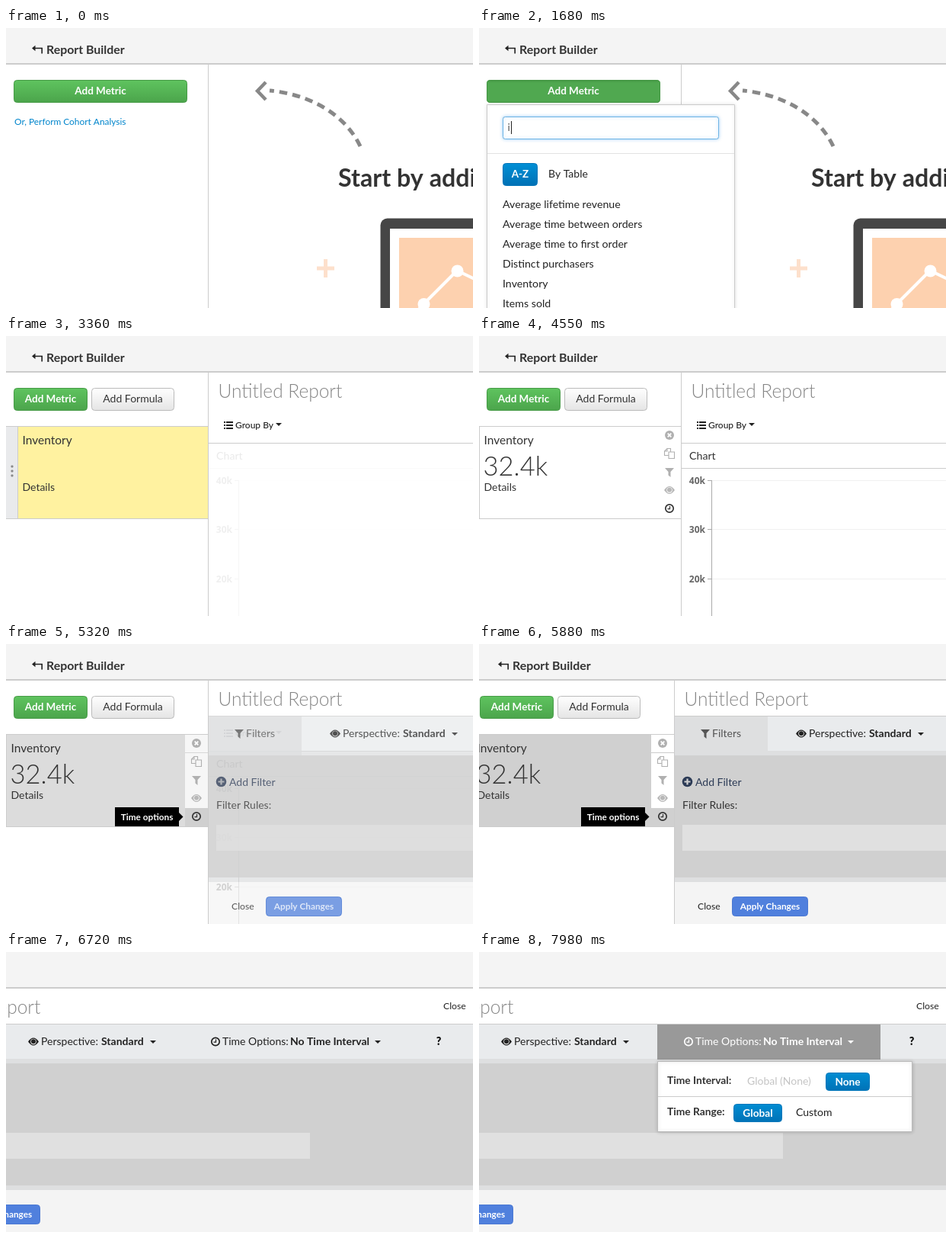
Animation, 613 px wide and 367 px high, one loop 9.87 s. Source, as an HTML page with a canvas:

```html
<!DOCTYPE html>
<html lang="en">
<head>
<meta charset="utf-8">
<title>Report Builder</title>
<style>
html, body { margin: 0; width: 100%; height: 100%; overflow: hidden; background: #fff; }
canvas { display: block; }
</style>
</head>
<body>
<canvas id="stage" width="613" height="367"></canvas>
<script>
const c = document.getElementById('stage').getContext('2d');
const LOOP = 9870, TICK = 70, W = 1010, H = 367;
const DARK = '#333', LINE = '#ccc', GREY = '#d0d0d0';

const clamp = v => Math.max(0, Math.min(1, v));
const smooth = u => u * u * (3 - 2 * u);
const ramp = (t, from, to) => clamp((t - from + TICK) / (to - from + TICK));

function text(s, x, y, size, color = DARK, weight = 400, align = 'left', family = 'Lato') {
  c.font = `${weight} ${size}px ${family}, sans-serif`;
  c.fillStyle = color;
  c.textAlign = align;
  c.fillText(s, x, y);
}
function rect(x, y, w, h, color) {
  c.fillStyle = color;
  c.fillRect(x, y, w, h);
}
function box(x, y, w, h, r, fill, border) {
  c.beginPath();
  c.roundRect(x + .5, y + .5, w - 1, h - 1, r);
  c.fillStyle = fill;
  c.fill();
  if (border) { c.strokeStyle = border; c.lineWidth = 1; c.stroke(); }
}
function gradient(y, h, top, bottom) {
  const g = c.createLinearGradient(0, y, 0, y + h);
  g.addColorStop(0, top);
  g.addColorStop(1, bottom);
  return g;
}
function stroke(d, color, width, dash = []) {
  c.strokeStyle = color;
  c.lineWidth = width;
  c.setLineDash(dash);
  c.stroke(new Path2D(d));
  c.setLineDash([]);
}
function fill(d, color) {
  c.fillStyle = color;
  c.fill(new Path2D(d));
}
function disc(x, y, r, color) {
  c.beginPath();
  c.arc(x, y, r, 0, 7);
  c.fillStyle = color;
  c.fill();
}
function fade(alpha, draw) {
  if (alpha <= 0) return;
  c.save();
  c.globalAlpha *= alpha;
  draw();
  c.restore();
}
function shadow(blur, color, draw) {
  c.save();
  c.shadowBlur = blur;
  c.shadowColor = color;
  draw();
  c.restore();
}

// Icons, placed by their centre
const icon = {
  clock(x, y, color) {
    c.beginPath();
    c.arc(x, y, 5.2, 0, 7);
    c.strokeStyle = color;
    c.lineWidth = 1.7;
    c.stroke();
    stroke(`M${x + .5} ${y - 3}V${y + .7}H${x - 2.5}`, color, 1.2);
  },
  eye(x, y, color) {
    fill(`M${x - 7} ${y}q7 -10 14 0q-7 10 -14 0`, color);
    disc(x, y, 3.7, '#fff');
    disc(x, y - .3, 3, color);
  },
  funnel(x, y, color) {
    fill(`M${x - 6} ${y - 6}h12l-4.5 5v7l-3 -2.5v-4.5z`, color);
  },
  copy(x, y, color) {
    stroke(`M${x - 1} ${y - 2}h7.5v8.5h-7.5zM${x - 1} ${y + 2.5}h-5.5v-5.5l3.5 -3.5h4.5v4.5M${x - 6} ${y - 3}h3v-3`, color, 1.1);
  },
  close(x, y, color) {
    disc(x, y, 6, color);
    stroke(`M${x - 2.3} ${y - 2.3}l4.6 4.6m0 -4.6l-4.6 4.6`, '#fff', 1.8);
  },
  plus(x, y, color) {
    disc(x, y, 6.8, color);
    stroke(`M${x - 4} ${y}h8m-4 -4v8`, GREY, 2.2);
  },
  caret(x, y, color) {
    fill(`M${x - 4} ${y - 2}h8l-4 4z`, color);
  }
};

function header() {
  rect(0, 0, W, 46, '#f4f4f4');
  rect(0, 46, W, 2, LINE);
  stroke('M47.2 33.5V26.5H36', '#222', 1.6);
  fill('M34 26.5l4.5 -3.7v7.4z', '#222');
  text('Report Builder', 53, 34, 15.9, DARK, 700);
}

function welcome() {
  stroke('M465 155C445 113 399 87 346 82', '#888', 5, [10.5, 7]);
  stroke('M341 71L330 82.5L341 94', '#888', 4.5);
  text('Start by adding a metric', 436, 208, 32.2, DARK, 700);
  stroke('M408 315h23M419.5 303v24', '#fde0cc', 5);
  box(491, 249, 200, 200, 9, '#464646');
  rect(504, 263, 200, 200, '#fff');
  rect(516, 275, 200, 200, '#fdd1af');
  stroke('M520 392L548 362L592 318L640 341', '#fff', 4);
  disc(548.5, 362, 8, '#fff');
  disc(592.5, 318.5, 8, '#fff');
}

function greenButton(w, hover, pressed) {
  box(10, 68, w, 30, 4, gradient(68, 30, '#5fc45f', '#4ba44b'), '#479b47');
  fade(hover, () => box(10, 68, w, 30, 4, '#50a850', '#449644'));
  if (pressed) rect(11, 69, w - 2, 3, gradient(69, 3, '#469a46', '#50a850'));
  text('Add Metric', 10 + w / 2, 87, 13.5, '#fff', 700, 'center');
}

function picker(t) {
  const query = t < 1680 ? '' : t < 1750 ? 'i' : t < 1820 ? 'inv' : t < 1960 ? 'inve' : 'inven';
  const filtered = t >= 1820;
  const names = filtered ? ['Inventory'] : ['Average lifetime revenue', 'Average time between orders',
    'Average time to first order', 'Distinct purchasers', 'Inventory', 'Items sold'];
  shadow(4, 'rgba(0,0,0,.12)', () => box(10, 100, 326, filtered ? 156 : 300, 0, '#fff', LINE));

  box(31, 116, 284, 30, 3, '#fff', LINE);
  fade(1 - ramp(t, 3010, 3150), () =>
    shadow(4, 'rgba(82,168,236,.5)', () => box(31, 116, 284, 30, 3, '#fff', '#6fb5e6')));
  text(query, 37.5, 135, 14, '#555');
  if (query && t < 2450) rect(Math.round(38.5 + c.measureText(query).width), 122, 1, 17, '#222');
  rect(11, 164, 324, 1, '#e2e2e2');

  box(31, 177, 46, 30, 4, gradient(177, 30, '#0090d6', '#0070b4'), '#0074b8');
  text('A-Z', 54, 196, 13.5, '#fff', 700, 'center');
  if (t >= 2590 && t < 2730) box(79, 177, 77, 30, 4, '#e6e6e6', '#c4c4c4');
  text('By Table', 91, 196, 14, '#222');
  if (t >= 2730) rect(11, 218, 324, 27, '#e6e6e6');
  names.forEach((name, i) => text(name, 31, 236 + 26 * i, 14.2, '#222'));
}

function startPage(t) {
  welcome();
  rect(265, 48, 1, H, LINE);
  greenButton(228, ramp(t, 420, 560), t >= 770);
  text('Or, Perform Cohort Analysis', 11, 127, 11.9, '#0085cc');
  if (t >= 280 && t < 420) rect(11, 129, 146, 1, '#0085cc');
  fade(ramp(t, 910, 1120), () => picker(t));
}

function metric(t) {
  const settle = ramp(t, 3430, 3780);
  const selected = ramp(t, 5180, 5390), hover = ramp(t, 4760, 4900);
  const inset = 15 * (1 - smooth(settle));
  rect(0, 118, 265, 122, LINE);
  rect(1, 119, 264, 120, '#fff');
  fade(1 - settle, () => rect(1, 119, 264, 120, '#fff2a0'));
  fade(selected, () => rect(0, 119, 265, 120, GREY));
  if (inset > .5) {
    rect(inset - 15, 119, 15, 120, '#e9eaec');
    rect(inset, 119, 1, 120, LINE);
    for (const y of [171, 177, 183]) box(inset - 9, y - 2, 4, 4, 1, '#888');
  }
  text('Inventory', 6.5 + inset, 142, 15.5, DARK);
  fade(settle, () => text('32.4k', 5.5 + inset, 183, 34.6, DARK, 300));
  text('Details', 6.5 + inset, 203, 14, DARK);

  fade(selected, () => {
    rect(235, 119, 30, 96, '#fff');
    rect(235, 142, 30, 1, LINE);
  });
  fade(hover, () => rect(235, 215, 30, 24, GREY));
  fade(settle, () => {
    icon.close(250, 130, '#b0b0b0');
    icon.copy(250, 154, '#b0b0b0');
    icon.funnel(250, 179, '#b0b0b0');
    icon.eye(250, 202, '#b8b8b8');
    icon.clock(250, 226, DARK);
  });
  fade(hover, () => {
    rect(143, 214, 84, 25, '#000');
    fill('M227 221l5.5 5.5l-5.5 5.5z', '#000');
    text('Time options', 185, 231, 11.8, '#fff', 700, 'center');
  });
}

function chart(t) {
  for (const y of [113, 117, 121]) {
    rect(286, y - 1, 2, 2, '#222');
    rect(289, y - 1, 9, 2, '#222');
  }
  text('Group By', 301, 121, 12, '#222', 500);
  icon.caret(358, 116, '#222');
  rect(266, 140, W, 1, LINE);
  fade(t >= 4550 ? 1 : .1 + .8 * ramp(t, 3430, 3780), () => {
    text('Chart', 276, 162, 14.2);
    rect(266, 173, W, 1, LINE);
    rect(305, 189, 1, H, '#aaa');
    ['40k', '30k', '20k'].forEach((label, i) => {
      const y = 189 + Math.round(64.3 * i);
      rect(306, y, W, 1, '#f0f0f0');
      rect(300, y, 5, 1, '#aaa');
      text(label, 297, y + 5, 12, '#666', 700, 'right', '"Open Sans"');
    });
  });
}

function option(label, value, x, valueX, caretX, color = '#222') {
  text(label, x, 122, 14, color);
  text(value, valueX, 122, 14, color, 700);
  icon.caret(caretX, 118, color);
}

function filterPanel(t) {
  const open = t >= 7980;
  rect(266, 95, W, 45, '#e9ebed');
  rect(266, 94, W, 1, LINE);
  rect(266, 140, W, 172, '#dedfe0');
  rect(266, 146, W, 160, GREY);
  rect(266, 95, 122, 51, '#dedfe0');
  rect(276, 237, 519, 34, '#e0e0e0');
  rect(266, 312, W, 55, '#f4f4f4');

  icon.funnel(306, 118, '#555');
  text('Filters', 315, 122, 14, '#555');
  icon.eye(432, 117.5, '#222');
  option('Perspective:', 'Standard', 442, 521, 589);
  if (open) rect(630, 95, 293, 46, '#999');
  const color = open ? '#fff' : '#222';
  icon.clock(671, 117.5, color);
  option('Time Options:', 'No Time Interval', 680, 769, 884, color);
  text('?', 964, 122, 14, '#111', 900, 'center');

  icon.plus(282.5, 180.5, '#2b3a55');
  text('Add Filter', 293, 186, 14, '#2b3a55');
  text('Filter Rules:', 276, 216, 14);
  text('Close', 296, 348, 12.2, '#222');
  box(341, 331, 100, 26, 4, '#5080dd', '#4a78d2');
  text('Apply Changes', 391, 348, 11.8, '#fff', 700, 'center');
  text('Close', 970, 75, 12.2, '#222');
  if (open) timeMenu();
}

function pill(label, x, y, w) {
  box(x, y, w, 24, 4, gradient(y, 24, '#008dd3', '#0072b6'), '#0077bb');
  text(label, x + w / 2, y + 16.5, 13.7, '#fff', 700, 'center');
}

function timeMenu() {
  shadow(5, 'rgba(0,0,0,.2)', () => box(630, 143, 335, 93, 0, '#fff', '#bbb'));
  rect(631, 189, 333, 1, LINE);
  text('Time Interval:', 643, 173, 13.8, DARK, 700);
  text('Global (None)', 748, 174, 14, '#c4c4c4');
  pill('None', 851, 158, 58);
  text('Time Range:', 643, 214, 13.8, DARK, 700);
  pill('Global', 730, 199, 64);
  text('Custom', 812, 215, 14, '#222');
}

function reportPage(t) {
  text('Untitled Report', 278.5, 81, 24.5, '#858585', 300);
  greenButton(97, 0, false);
  box(112, 68, 109, 30, 4, gradient(68, 30, '#fff', '#e4e4e4'), '#bbb');
  text('Add Formula', 166.5, 87, 14, DARK, 400, 'center');
  chart(t);
  fade(ramp(t, 5180, 5390), () => filterPanel(t));
  metric(t);
  rect(265, 48, 1, H, LINE);
}

function draw(now) {
  const t = Math.floor(now % LOOP / TICK) * TICK;
  const scroll = Math.round(396 * smooth(clamp((t - 5797) / 923)));
  rect(0, 0, 613, H, '#fff');
  c.save();
  c.translate(-scroll, 0);
  header();
  (t < 3360 ? startPage : reportPage)(t);
  c.restore();
}

const start = performance.now();
function frame() {
  draw(performance.now() - start);
  requestAnimationFrame(frame);
}
frame();
</script>
</body>
</html>
```
